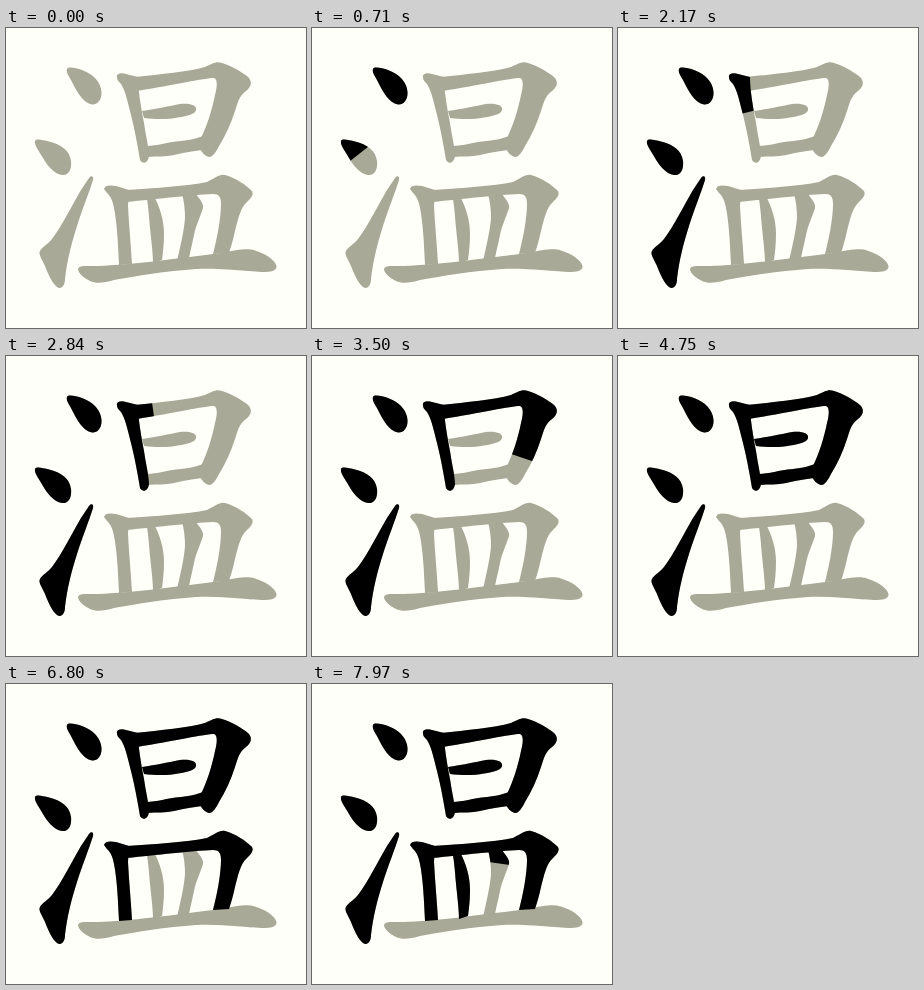
Write an HTML page that moves like this. It is 300x300 px and loops after 8 s.

```html
<!DOCTYPE html>
<html lang="zh">
<head>
<meta charset="utf-8">
<title>Stroke order</title>
<style>
  html, body { margin: 0; width: 100%; height: 100%; overflow: hidden; background: #fffff9; }
  svg { display: block; width: 100vw; height: 100vh; }
</style>
</head>
<body>
<svg id="stage" viewBox="0 0 300 300"></svg>
<script>
const NS = 'http://www.w3.org/2000/svg';
const LOOP = 8000;
const GREY = '#a9a998';

// Each stroke: outline, brush path, brush width, start and end time in ms.
const strokes = [
  { shape: 'M61 41C62 38 70 40 76 42C87 46 95 54 95.5 64C96 71 92 77 86 76.5C77 75 71 64 65 52C62 47 60 44 61 41Z',
    brush: 'M58 36L93 79', width: 60, from: 0, to: 390 },
  { shape: 'M29 113C30 110 37 112 43 113.5C55 116 64 123 65 133C66 142 62 148 56 147C48 146 41 137 37 130C33 123 28 117 29 113Z',
    brush: 'M28 107L62 150', width: 60, from: 510, to: 920 },
  { shape: 'M83 150C85 147 88 148 87 152C83 165 76 182 71 198C65 217 61 233 59 251C59 258 55 262 51 259C46 255 42 246 39 238C36 231 32 226 34 223C36 219 42 216 46 211C56 198 66 177 75 162Z',
    brush: 'M40 264L86 146', width: 70, from: 1130, to: 1710 },
  { shape: 'M111 49C110 46 115 44 120 46L132 49C132 62 135 79 138 95C140 109 143 120 143 128C142 135 137 137 134 132C132 120 129 103 125 87C121 71 119 62 115 56C112 53 111 52 111 49Z',
    brush: 'M117 42L140 138', width: 50, from: 1920, to: 2480 },
  { shape: 'M129 49C155 46 182 44 199 39C206 36 210 33 216 35C226 38 236 44 242 49C247 54 245 59 240 63C233 68 232 74 229 83C225 96 219 108 213 118C210 124 207 129 203 129C199 128 195 124 194 120L195 110C201 98 206 82 209 67C211 60 212 51 208 50C199 50 168 57 131 63Z',
    brush: 'M129 56L200 46Q228 42 226 60L202 131', width: 50, from: 2750, to: 3650 },
  { shape: 'M136 83C150 81 164 78 174 76C184 75 191 77 190 82C189 86 182 88 172 89.5C160 92 148 91 138 90Z',
    brush: 'M135 84L191 81', width: 40, from: 3920, to: 4300 },
  { shape: 'M140 118C152 118 160 114 175 113C185 112 192 110 202 106L202 122C192 122 180 124 168 127C160 129 150 128 142 129Z',
    brush: 'M139 124L204 115', width: 50, from: 4460, to: 4750 },
  { shape: 'M98 161C99 157 104 157 110 158L123 162L122 178C123 198 125 218 126 236L113 237C112 215 111 195 108 180C106 170 104 168 101 165Z',
    brush: 'M107 154L120 239', width: 50, from: 4970, to: 5630 },
  { shape: 'M121 162C150 160 181 158 201 154C208 151 213 146 219 147C230 150 240 157 246 163C248 167 245 170 241 174C234 180 232 192 229 203C227 212 225 219 223 225L207 226C211 211 215 190 215 176C215 169 213 166 207 166C185 167 150 171 121 174Z',
    brush: 'M121 168L205 160Q232 156 230 174L214 229', width: 50, from: 5740, to: 6590 },
  { shape: 'M140 168L148 168C154 180 158 192 158 206C158 216 157 224 156 232L147 235C147 222 144 204 143 188C142 180 142 174 140 168Z',
    brush: 'M145 166L152 236', width: 40, from: 6850, to: 7600 },
  { shape: 'M176 166L190 166C193 171 198 175 197 180C195 187 190 197 188 207C186 217 184 224 183 231L171 233C174 220 178 203 179 190C179 181 178 173 176 166Z',
    brush: 'M188 163L178 234', width: 50, from: 7800, to: 8540 },
  { shape: 'M72 241C73 237 80 238 92 238C125 237 175 230 215 225C232 222 241 220 249 222.5C260 226 269 232 270.5 238C271 243 265 244 256 244C235 243 215 240 190 241C160 243 130 248 108 252C98 255 90 256 84 253C78 250 72 245 72 241Z' }
];

const stage = document.getElementById('stage');

function add(parent, tag, attrs) {
  const el = document.createElementNS(NS, tag);
  for (const key in attrs) el.setAttribute(key, attrs[key]);
  return parent.appendChild(el);
}

add(stage, 'rect', { width: 300, height: 300, fill: '#fffff9' });
for (const s of strokes) add(stage, 'path', { d: s.shape, fill: GREY });

const inked = strokes.filter(s => s.brush);
inked.forEach((s, i) => {
  const clip = add(stage, 'clipPath', { id: 'clip' + i });
  add(clip, 'path', { d: s.shape });
  const group = add(stage, 'g', { 'clip-path': `url(#clip${i})` });
  s.ink = add(group, 'path', {
    d: s.brush, fill: 'none', stroke: '#000', 'stroke-width': s.width,
    'stroke-linejoin': 'round', pathLength: 1
  });
});

function draw(time) {
  for (const s of inked) {
    const p = Math.min(1, Math.max(0, (time - s.from) / (s.to - s.from)));
    s.ink.setAttribute('visibility', p > 0 ? 'visible' : 'hidden');
    s.ink.setAttribute('stroke-dasharray', p < 1 ? `${p} 2` : 'none');
    s.ink.setAttribute('stroke-linecap', p < 1 ? 'butt' : 'square');
  }
}

let start;
function tick(now) {
  if (start === undefined) start = now;
  draw((now - start) % LOOP);
  requestAnimationFrame(tick);
}
draw(0);
requestAnimationFrame(tick);
</script>
</body>
</html>
```
